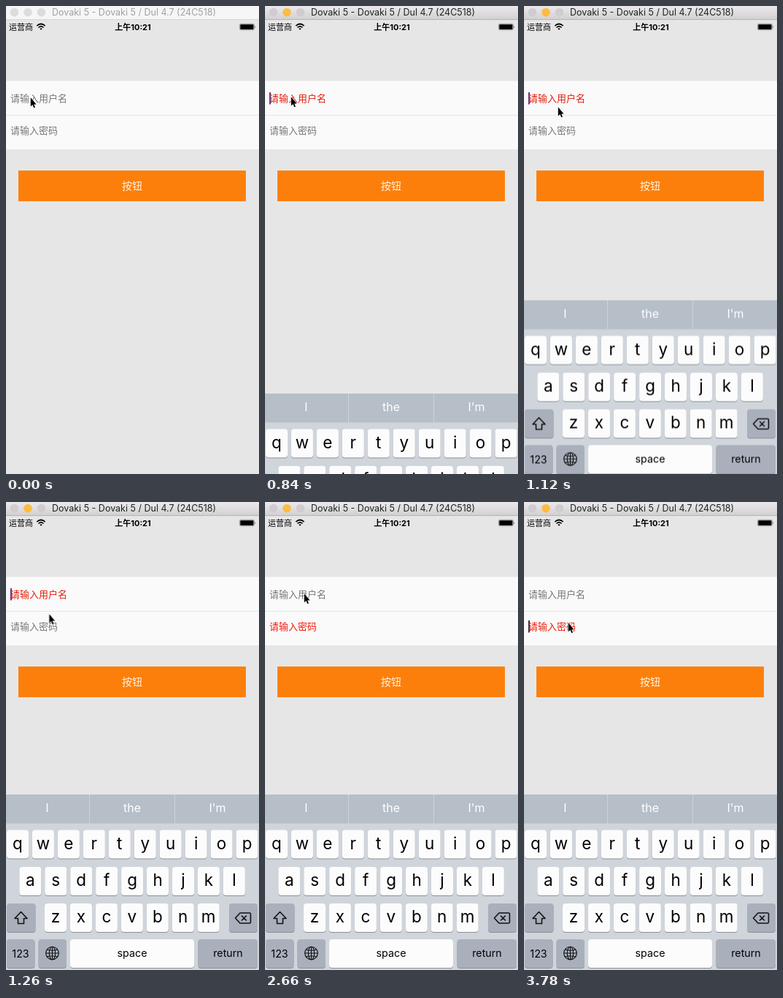
An HTML page that plays this animation: 347x640 px, repeating every 3.92 s.

```html
<!DOCTYPE html>
<html lang="zh">
<head>
<meta charset="utf-8">
<title>Login form</title>
<style>
html, body { margin: 0; width: 100%; height: 100%; overflow: hidden; background: #e6e6e6; }
svg { display: block; width: 100vw; height: 100vh; }
text { font-family: "Noto Sans CJK SC", "Noto Sans CJK", sans-serif; }
.latin, .keyboard text { font-family: Inter, Roboto, sans-serif; }
.mid { text-anchor: middle; }
.letter { font-size: 22.5px; }
.word { font-size: 14.3px; }
.guess { font-size: 16px; fill: #fff; }
.icon { fill: none; stroke: #111; stroke-width: 1.6; stroke-linejoin: round; stroke-linecap: round; }
.field { font-size: 13px; font-weight: 300; fill: #777; }

.active, .user, .pass, .caret, .keyboard, .pointer {
  animation: 3920ms step-end infinite;
}
.active { animation-name: activate; }
.user { animation-name: user; }
.pass { animation-name: pass; }
.user-caret { animation-name: user-caret; fill: #5b2462; }
.pass-caret { animation-name: pass-caret; fill: #241c28; }
.keyboard { animation-name: rise; }
.pointer { animation-name: point; }

@keyframes activate {
  0% { opacity: 0; }
  10.714%, 100% { opacity: 1; }
}
@keyframes user {
  0%, 50%, 85.714%, 100% { fill: #777; }
  21.428%, 71.428% { fill: #e0200f; }
}
@keyframes pass {
  0%, 71.428% { fill: #777; }
  50%, 85.714%, 100% { fill: #f01c0a; }
}
@keyframes user-caret {
  0%, 39.285%, 50%, 85.714%, 100% { opacity: 0; }
  21.428%, 71.428% { opacity: 1; }
  35.714% { opacity: .6; }
  46.428% { opacity: .35; }
}
@keyframes pass-caret {
  0%, 67.857%, 100% { opacity: 0; }
  50%, 85.714% { opacity: 1; }
  64.285% { opacity: .5; }
}
@keyframes rise {
  0% { transform: translateY(240px); }
  21.428% { transform: translateY(130px); }
  25% { transform: translateY(19.5px); }
  28.571% { transform: translateY(2.5px); }
  32.142%, 100% { transform: none; }
}
@keyframes point {
  0% { transform: translate(33px, 124px); }
  3.571% { transform: translate(35px, 123px); }
  28.571% { transform: translate(46px, 137px); }
  32.142% { transform: translate(58.5px, 152px); }
  35.714% { transform: translate(56px, 162px); }
  39.285% { transform: translate(52px, 167px); }
  42.857% { transform: translate(50px, 167px); }
  60.714% { transform: translate(51px, 152px); }
  64.285% { transform: translate(53px, 131px); }
  67.857% { transform: translate(53px, 124px); }
  78.571% { transform: translate(56px, 142px); }
  82.142%, 100% { transform: translate(60px, 164px); }
}
</style>
</head>
<body>
<svg viewBox="0 0 347 640" preserveAspectRatio="none">
  <defs>
    <linearGradient id="bar" x2="0" y2="1">
      <stop stop-color="#ebe9eb"/>
      <stop offset="1" stop-color="#d2d0d2"/>
    </linearGradient>
  </defs>
  <rect width="347" height="640" fill="#e6e6e6"/>

  <g id="window"></g>

  <g>
    <text x="4" y="32.5" font-size="11" font-weight="500">运营商</text>
    <g fill="none" stroke="#000" stroke-width="1.7">
      <path d="M42.4 27.2Q48 21.8 53.6 27.2M44.5 29.5Q48 26.2 51.5 29.5"/>
      <path d="M46.3 30.9Q48 29.5 49.7 30.9L48 32.8Z" fill="#000" stroke="none"/>
    </g>
    <text class="mid" x="174" y="32.5" font-size="11" font-weight="700">上午<tspan class="latin">10:21</tspan></text>
    <rect x="320.4" y="24.4" width="20" height="8.4" rx="1.8" fill="none" stroke="#777" stroke-width=".7"/>
    <rect x="321.3" y="25.3" width="18.2" height="6.6" rx="1"/>
    <path d="M341.3 26.9q1.5 1.7 0 3.4z" fill="#333"/>
  </g>

  <rect y="102.5" width="347" height="93.5" fill="#fafafa"/>
  <rect y="149" width="347" height="1" fill="#e6e6e6"/>
  <text class="field user" x="6" y="131">请输入用户名</text>
  <text class="field pass" x="6" y="175">请输入密码</text>
  <rect class="caret user-caret" x="6" y="118" width="1.8" height="16.5"/>
  <rect class="caret pass-caret" x="6" y="162" width="1.8" height="16.5"/>

  <rect x="17" y="225" width="312" height="42" fill="#fd7f0b"/>
  <text class="mid" x="173" y="251.3" font-size="14" fill="#fff6e4">按钮</text>

  <g class="keyboard">
    <rect y="400" width="347" height="240" fill="#d0d5db"/>
    <rect y="400" width="347" height="39.5" fill="#b6bec8"/>
    <path d="M114.5 400v39.5M231.5 400v39.5" stroke="#cdd3da"/>
    <g id="keys"></g>
    <path class="icon" d="M20.5 560.5L29 569.5H24.5V576.5H16.5V569.5H12Z"/>
    <path class="icon" d="M314.5 569L321 562H334Q335.5 562 335.5 563.5V574.5Q335.5 576 334 576H321ZM323.5 566l6 6m0-6l-6 6"/>
    <g class="icon" style="stroke-width:1.1">
      <circle cx="63.5" cy="617" r="8.8"/>
      <ellipse cx="63.5" cy="617" rx="4.2" ry="8.8"/>
      <path d="M63.5 608.2v17.6M54.7 617h17.6M56.3 612q7.2 2.6 14.4 0M56.3 622q7.2-2.6 14.4 0"/>
    </g>
  </g>

  <path class="pointer" d="M.8 1.2V13.4L3.4 11L5.2 15.2L7 14.4L5.2 10.4H8.6Z" fill="#000" stroke="#fff" stroke-width="1" paint-order="stroke"/>
</svg>
<script>
const titleBar = (bar, line, dots, ink) => `
  <rect width="347" height="18.5" fill="${bar}"/>
  <rect y="18" width="347" height="1" fill="${line}"/>
  ${dots.map((fill, i) => `<circle cx="${11.5 + 18.5 * i}" cy="8.7" r="5.8" fill="${fill}"/>`).join('')}
  <text class="latin" x="63" y="13.3" font-size="12.5" fill="${ink}">Dovaki 5 - Dovaki 5 / Dul 4.7 (24C518)</text>`;

document.getElementById('window').innerHTML =
  titleBar('#f6f6f6', '#d6d6d6', ['#dcdcdc', '#dcdcdc', '#dcdcdc'], '#a0a0a0') +
  `<g class="active">${titleBar('url(#bar)', '#b5b3b5', ['#cfcdcf', '#fdbc40', '#cfcdcf'], '#222')}</g>`;

const label = (x, y, kind, text) => `<text class="mid ${kind}" x="${x}" y="${y}">${text}</text>`;

const key = (x, y, width, fill = '#fcfcfc') => `
  <rect x="${x}" y="${y + 1}" width="${width}" height="39" rx="4" fill="#8b8f95"/>
  <rect x="${x}" y="${y}" width="${width}" height="39" rx="4" fill="${fill}"/>`;

const row = (letters, left, y) => [...letters].map((letter, i) => {
  const x = left + 34.95 * i;
  return key(x, y, 30) + label(x + 15, y + 26, 'letter', letter);
}).join('');

const dark = '#a9b0bc';
document.getElementById('keys').innerHTML = [
  label(56.5, 424, 'guess', 'I'),
  label(173, 424, 'guess', 'the'),
  label(290, 424, 'guess', "I'm"),
  row('qwertyuiop', 1, 448.5),
  row('asdfghjkl', 18.3, 499),
  row('zxcvbnm', 53, 549),
  key(1, 549, 39.5, dark),
  key(306, 549, 39, dark),
  key(1, 598, 38.5, dark),
  key(44.5, 598, 38.5, dark),
  key(88, 598, 170),
  key(263.5, 598, 81.5, dark),
  label(20, 623, 'word', '123'),
  label(173, 622, 'word', 'space'),
  label(304.5, 622, 'word', 'return'),
].join('');
</script>
</body>
</html>
```
